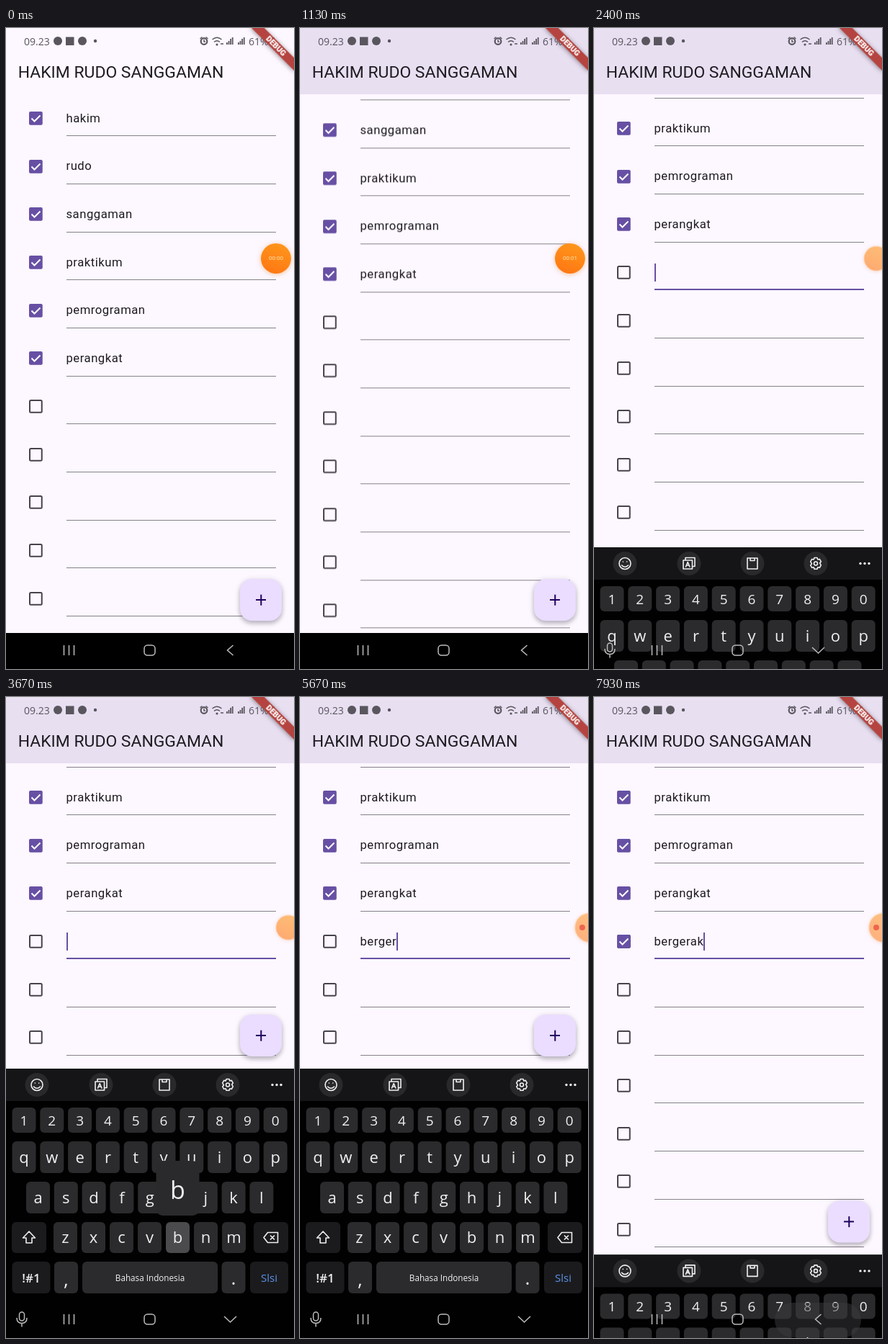
An HTML page for the animation above (8000 ms loop, 400 px wide and 890 px high).

```html
<!DOCTYPE html>
<html lang="id">
<head>
<meta charset="utf-8">
<title>Daftar tugas</title>
<style>
  @property --kb { syntax: '<length>'; inherits: false; initial-value: 374px; }

  :root { --paper: #fdf7ff; --ink: #1d1b20; --purple: #6750a4; }
  html, body { margin: 0; width: 100%; height: 100%; overflow: hidden; background: var(--paper); }
  body { position: relative; width: 400px; height: 890px; font-family: Roboto, sans-serif; color: var(--ink); }
  body > * { position: absolute; }
  .loop, .loop * { animation: 8s linear infinite; }

  /* List */
  .view { left: 0; top: 91.67px; width: 400px; height: 748.33px; overflow: hidden; }
  .stretch { height: 100%; transform-origin: bottom; animation-name: stretch; }
  .list { position: relative; animation-name: scroll; }
  .row { position: absolute; left: 0; width: 400px; height: 66.67px; }
  .box { position: absolute; left: 32.3px; top: 24px; width: 18.75px; height: 18.75px; }
  .field { position: absolute; left: 83.5px; top: 20.8px; font-size: 16.67px; line-height: 25px; letter-spacing: .52px; white-space: pre; }
  .line { position: absolute; left: 83.5px; top: 57.3px; width: 291.5px; height: 1px; background: #85828a; }
  .focus { position: absolute; left: 83.5px; top: 56.3px; width: 291.5px; height: 2px; background: var(--purple); animation-name: focus; animation-timing-function: step-end; }
  .caret { display: inline-block; width: 2px; height: 25px; vertical-align: top; background: var(--purple); animation-name: blink; animation-timing-function: step-end; }
  .tick { animation-name: tick; }

  /* Chrome around the list */
  .bar { left: 0; top: 0; width: 400px; height: 91.67px; animation-name: bar; }
  .title { position: absolute; left: 16.67px; top: 47px; margin: 0; font-size: 22.92px; line-height: 30px; font-weight: 400; white-space: nowrap; }
  .fab { left: 325px; top: 765px; width: 58.33px; height: 58.33px; border-radius: 16.67px; background: #eaddff;
    box-shadow: 0 4px 6px rgba(50, 45, 60, .28), 0 1px 9px rgba(50, 45, 60, .13);
    animation-name: fab; transform: translateY(min(0px, calc(var(--kb) - 324px))); }
  .fab::before, .fab::after { content: ""; position: absolute; left: 21.9px; top: 28.2px; width: 14.6px; height: 2px; background: #21005d; }
  .fab::after { transform: rotate(90deg); }
  .keyboard { left: 0; top: 516px; animation-name: keyboard; transform: translateY(var(--kb)); }
  .navbg { left: 0; top: 840px; width: 400px; height: 50px; background: #000; }
  .nav { left: 0; top: 840px; }
  .open { animation-name: open; animation-timing-function: step-end; }
  .closed { animation-name: closed; animation-timing-function: step-end; }
  .press { animation-name: press; animation-timing-function: step-end; }
  svg { display: block; overflow: visible; }
  svg text { font-family: "Open Sans", sans-serif; }

  /* Recorder bubble */
  .bubble { left: 354px; top: 299px; width: 42px; height: 42px; border-radius: 50%; background: linear-gradient(200deg, #ff991c, #ff7412);
    box-shadow: 0 1px 6px rgba(230, 150, 60, .5); animation-name: bubble; }
  .timer { display: block; font-size: 8px; line-height: 42px; text-align: center; color: #ffe6ae; animation-name: timer; }
  .dot { left: 388px; top: 316px; width: 8px; height: 8px; border-radius: 50%; background: #ee6650; animation-name: dot; }

  @keyframes scroll {
    0%, 3.1% { transform: none; }
    8.75% { transform: translateY(-40px); }
    14.125% { transform: translateY(-116.5px); }
    18.5%, 100% { transform: translateY(-186px); }
  }
  @keyframes stretch {
    0%, 18.5% { transform: none; animation-timing-function: ease-out; }
    22.4%, 23% { transform: scaleY(1.0113); animation-timing-function: ease-out; }
    26.5%, 100% { transform: none; }
  }
  @keyframes bar { 0%, 3.2% { background: var(--paper); } 6%, 100% { background: #e8dff1; } }
  @keyframes keyboard {
    0%, 28.81% { --kb: 374px; animation-timing-function: cubic-bezier(.4, 0, .2, 1); }
    32.44% { --kb: 0px; }
    97.525% { --kb: 0px; animation-timing-function: cubic-bezier(.493, 0, .368, .752); }
    100% { --kb: 346.7px; }
  }
  @keyframes fab {
    0%, 29.7% { --kb: 374px; animation-timing-function: cubic-bezier(.4, 0, .2, 1); }
    33.4% { --kb: 0px; }
    97.525% { --kb: 0px; animation-timing-function: cubic-bezier(.493, 0, .368, .752); }
    100% { --kb: 346.7px; }
  }
  @keyframes focus { 0% { opacity: 0; } 27.5%, 100% { opacity: 1; } }
  @keyframes blink {
    0%, 33.75%, 57.5%, 79.1%, 91.6% { opacity: 0; }
    27.5%, 40%, 62.5%, 85.4%, 97.8%, 100% { opacity: 1; }
  }
  @keyframes tick { 0%, 83.9% { opacity: 0; } 85.9%, 100% { opacity: 1; } }
  @keyframes open { 0%, 97.3%, 100% { opacity: 0; } 29% { opacity: 1; } }
  @keyframes closed { 0%, 97.3%, 100% { opacity: 1; } 29% { opacity: 0; } }
  @keyframes press { 0% { opacity: 0; } 95.8%, 100% { opacity: 1; } }
  @keyframes bubble {
    0%, 17.5% { transform: none; opacity: 1; }
    21.25%, 65.8% { transform: translateX(17px) scale(.81); opacity: .6; }
    68.75%, 100% { transform: translateX(27px) scale(.96); opacity: .55; }
  }
  @keyframes timer { 0%, 17.5% { opacity: 1; } 19%, 100% { opacity: 0; } }
  @keyframes dot { 0%, 62.4% { opacity: 0; } 64.1%, 100% { opacity: 1; } }
</style>
</head>
<body>
  <main class="view loop"><div class="stretch"><div class="list" id="list"></div></div></main>

  <header class="bar loop"><h1 class="title">HAKIM RUDO SANGGAMAN</h1></header>

  <svg class="status" style="left:0;top:0" width="400" height="92" fill="none" stroke="#59565e" stroke-width="1.4">
    <g fill="#59565e" stroke="none">
      <text x="25" y="23.5" font-size="14">09.23</text>
      <circle cx="72" cy="18" r="6"/>
      <rect x="83" y="12.5" width="11.5" height="11.5"/>
      <circle cx="106" cy="18" r="6"/>
      <circle cx="124" cy="18" r="2.2"/>
      <text x="337" y="23.5" font-size="14">61%</text>
      <rect x="366" y="13" width="7" height="11" rx="1.5"/>
      <path d="M306 23v-3h1.8v3zM308.6 23v-5h1.8v5zM311.2 23v-8h1.8v8zM313.8 23v-10h1.8v10zM322 23v-3h1.8v3zM324.6 23v-5h1.8v5zM327.2 23v-8h1.8v8zM329.8 23v-10h1.8v10z"/>
      <circle cx="293" cy="23" r="1.6"/>
    </g>
    <circle cx="275" cy="18.5" r="4.3" stroke-width="2.2"/>
    <path d="M275 16v3h2M269.5 15l3-2.5M280.5 15l-3-2.5M286.5 16q6.500-5.500 13 0M289 19.5q4-3.500 8 0M298 22h4"/>
    <g transform="translate(400 0) rotate(45)" stroke="none" style="filter:drop-shadow(0 1px 3px rgba(40,30,40,.5))">
      <rect x="-42" y="29.2" width="84" height="12.5" fill="#b5433f"/>
      <text y="39.2" font-size="10.6" font-weight="900" fill="#fff" text-anchor="middle" style="font-family:Roboto,sans-serif">DEBUG</text>
    </g>
  </svg>

  <div class="fab loop"></div>
  <div class="navbg"></div>

  <svg class="keyboard loop" width="400" height="374" fill="#f0f0f2">
    <rect width="400" height="374" fill="#010102"/>
    <rect width="400" height="45" fill="#151517"/>
    <g fill="#29292c">
      <circle cx="43" cy="22.5" r="16.5"/><circle cx="132" cy="22.5" r="16.5"/>
      <circle cx="220" cy="22.5" r="16.5"/><circle cx="308" cy="22.5" r="16.5"/>
    </g>
    <g fill="none" stroke="#f0f0f2" stroke-width="1.6" stroke-linejoin="round" stroke-linecap="round">
      <circle cx="43" cy="22.5" r="8"/>
      <path d="M38.5 25q4.500 4.500 9 0M40.3 20v.1M45.7 20v.1"/>
      <path d="M127 18v-3.500h13v12h-3M124 18h12.5v12h-12.500zM127.5 27l2.700-6.500 2.700 6.500M128.3 25h3.800"/>
      <path d="M213 15h14v15h-14zM217 15v3.500h6v-3.500"/>
      <circle cx="308" cy="22.5" r="2.5"/>
      <path d="M306 14.5h4l.8 2.400 2.500-.5 2 3.500-1.700 2 1.700 3-2 3.400-2.500-.5-.8 2.400h-4l-.8-2.400-2.500.5-2-3.400 1.700-2-1.700-3 2-3.500 2.500.5z"/>
    </g>
    <circle cx="370" cy="22.5" r="1.7"/><circle cx="376" cy="22.5" r="1.7"/><circle cx="382" cy="22.5" r="1.7"/>
    <g id="keys" text-anchor="middle"></g>
    <g fill="none" stroke="#f0f0f2" stroke-width="1.6" stroke-linejoin="round">
      <path d="M32 226l-8.500 9h4.500v7h8v-7h4.500z"/>
      <path d="M358 234.5l5.500-7h14v14h-14zM367 231.5l6 6M373 231.5l-6 6"/>
    </g>
    <g id="popup" text-anchor="middle">
      <rect x="-30" width="60" height="76" rx="9" fill="#2a2a2c"/>
      <text y="53" font-size="34"></text>
    </g>
  </svg>

  <svg class="nav loop" width="400" height="50" fill="none" stroke="#bcbcbe" stroke-width="1.5">
    <rect class="press" x="251" y="1" width="120" height="48" rx="24" fill="rgba(60,60,64,.5)" stroke="none"/>
    <path d="M80.5 17v14M87.5 17v14M94.5 17v14"/>
    <rect x="192" y="17" width="15" height="14" rx="4.5"/>
    <path class="closed" d="M315.5 17l-8 7 8 7"/>
    <g class="open">
      <path d="M303 20l8.500 8 8.500-8"/>
      <rect x="18.5" y="14" width="7" height="12" rx="3.5"/>
      <path d="M15 22q0 7.500 7 7.500t7-7.500M22 29.5v5"/>
    </g>
  </svg>

  <div class="bubble loop"><span class="timer" id="timer">00:00</span></div>
  <div class="dot loop"></div>

<script>
  const LOOP = 8000, ROWS = 14, ACTIVE = 6, HOLD = 130;
  const KEY = '#2b2b2d', SIDE_KEY = '#1b1b1d', PRESSED = '#4b4b4e';
  const words = ['hakim', 'rudo', 'sanggaman', 'praktikum', 'pemrograman', 'perangkat'];
  // letter, key down, letter shown
  const strokes = [
    ['b', 3640, 3710], ['e', 3850, 3930], ['r', 4000, 4270], ['g', 4980, 5110],
    ['e', 5270, 5340], ['r', 5460, 5530], ['a', 5700, 5770], ['k', 5800, 5870]
  ];
  const $ = id => document.getElementById(id);

  const frame = '<rect x="1" y="1" width="16.75" height="16.75" rx="1.5" fill="none" stroke="#47434c" stroke-width="2"/>';
  const check = cls => `<g class="${cls}"><rect width="18.75" height="18.75" rx="2" fill="#6750a4"/>
    <path d="M3.5 9.5l4 4 8-8" fill="none" stroke="#fff" stroke-width="2"/></g>`;

  $('list').innerHTML = Array.from({ length: ROWS }, (_, i) => {
    const active = i === ACTIVE;
    const mark = i < words.length ? check('') : frame + (active ? check('tick') : '');
    return `<div class="row" style="top:${i * 66.667}px">
      <svg class="box">${mark}</svg>
      <div class="field">${active ? '<span id="typed"></span><i class="caret"></i>' : words[i] || ''}</div>
      <div class="line"></div>${active ? '<div class="focus"></div>' : ''}</div>`;
  }).join('');

  const keys = {};
  function addKey(label, x, y, w, h, { size = 22, dy = 7.5, fill = KEY, attrs = '' } = {}) {
    $('keys').insertAdjacentHTML('beforeend',
      `<g><rect x="${x - w / 2}" y="${y}" width="${w}" height="${h}" rx="6" fill="${fill}"/>
       <text x="${x}" y="${y + h / 2 + dy}" font-size="${size}" ${attrs}>${label}</text></g>`);
    keys[label] = { x, y, rect: $('keys').lastElementChild.firstElementChild };
  }
  const addRow = (chars, x, y, h, step = 38.8, style) =>
    [...chars].forEach((c, i) => addKey(c, x + i * step, y, 33, h, style));

  addRow('1234567890', 25, 54, 35, 38.8, { size: 19, dy: 7 });
  addRow('qwertyuiop', 25, 101, 44);
  addRow('asdfghjkl', 44.5, 157, 44);
  addRow('zxcvbnm', 82.5, 213, 43, 39);
  addKey('', 32, 213, 48, 43, { fill: SIDE_KEY });
  addKey('', 368, 213, 48, 43, { fill: SIDE_KEY });
  addKey('!#1', 35, 268, 53, 44, { size: 17, dy: 6.5, fill: SIDE_KEY, attrs: 'font-weight="600"' });
  addKey(',', 83.5, 268, 33, 44, { size: 26, dy: 12 });
  addKey('Bahasa Indonesia', 200, 268, 188, 44, { size: 11.7, dy: 4.5 });
  addKey('.', 316, 268, 33, 44, { size: 26, dy: 10 });
  addKey('Slsi', 365.5, 268, 53, 44, { size: 15, dy: 6, fill: SIDE_KEY, attrs: 'fill="#5c93ea"' });

  const popup = $('popup');
  let start, pressed;
  function draw(now) {
    start ??= now;
    const t = (now - start) % LOOP;
    $('timer').textContent = t < 1000 ? '00:00' : '00:01';
    $('typed').textContent = strokes.filter(s => t >= s[2]).map(s => s[0]).join('');

    const hit = strokes.findLast(s => t >= s[1] && t < s[1] + HOLD);
    pressed?.rect.setAttribute('fill', KEY);
    pressed = hit && keys[hit[0]];
    popup.style.display = pressed ? '' : 'none';
    if (pressed) {
      pressed.rect.setAttribute('fill', PRESSED);
      popup.setAttribute('transform', `translate(${pressed.x} ${pressed.y - 85})`);
      popup.lastElementChild.textContent = hit[0];
    }
    requestAnimationFrame(draw);
  }
  requestAnimationFrame(draw);
</script>
</body>
</html>
```
